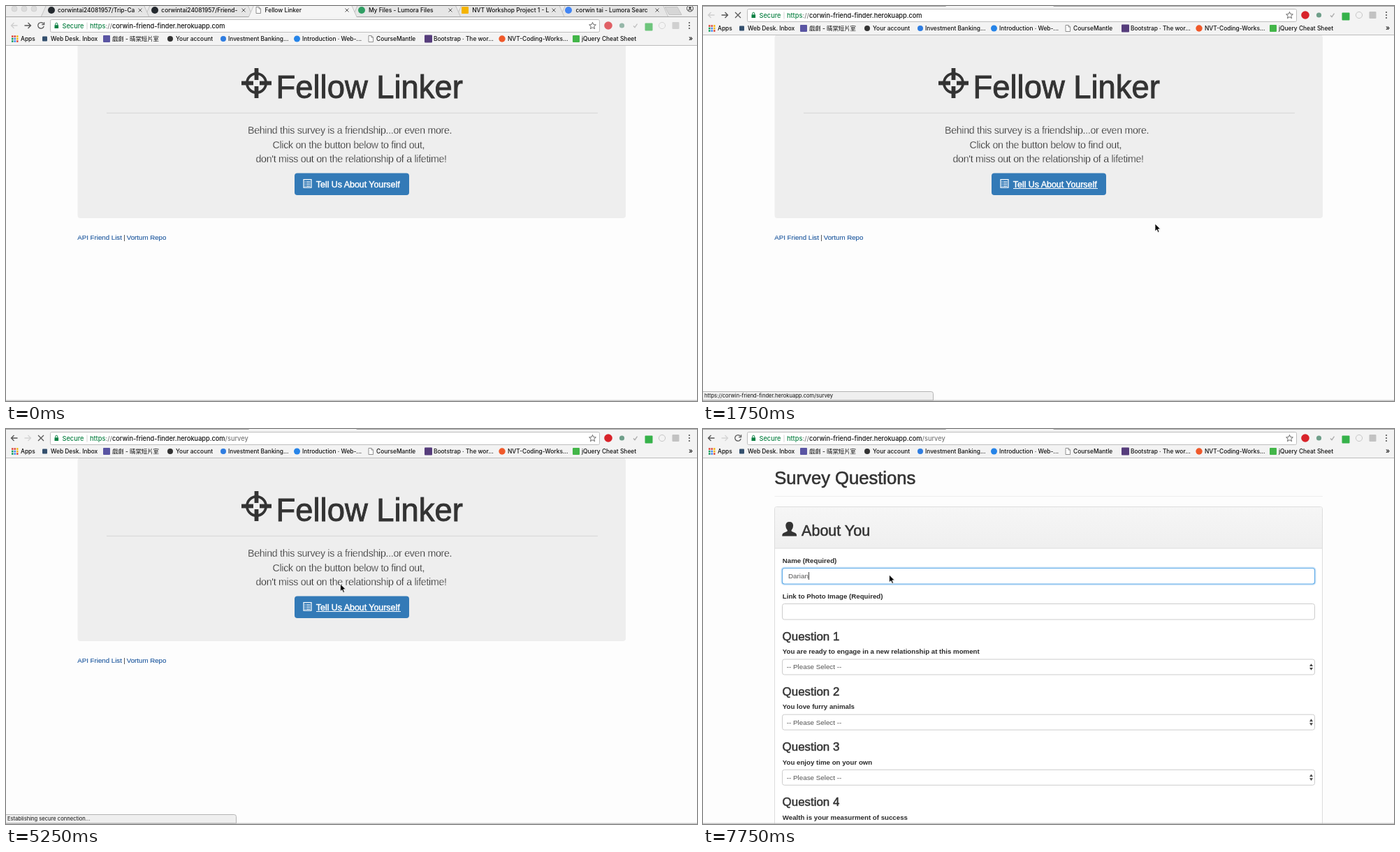
Recreate the animation shown at these times as an HTML page. Size 989 by 566 pixels, loop 8000 ms.

```html
<!DOCTYPE html>
<html lang="en">
<head>
<meta charset="utf-8">
<title>Fellow Linker</title>
<style>
html, body { margin: 0; width: 100%; height: 100%; overflow: hidden; background: #fdfdfd; }
svg { display: block; width: 989px; height: 566px; }
text { white-space: pre; }
.ui { font: 500 8.4px Inter, "Noto Sans CJK TC", "Noto Sans CJK SC", "Noto Sans CJK", sans-serif; fill: #111; }
.url { font-size: 9.2px; }
.tip { font-size: 7.6px; font-weight: 400; }
.page { font: 9.7px "Liberation Sans", Arial, sans-serif; fill: #333; }
.med { stroke: #333; stroke-width: .5px; }
.lead { font-size: 14.2px; letter-spacing: -.29px; fill: #262626; stroke: #eee; stroke-width: .3px; }
.label { font-size: 9.7px; font-weight: bold; fill: #2b2b2b; }
.link { fill: #17539b; stroke: #17539b; stroke-width: .1px; }
.field { fill: #fff; stroke: #ccc; }
.line { fill: none; stroke: #5a5a5a; stroke-width: 1.3px; }
</style>
</head>
<body>
<svg id="stage" viewBox="0 0 989 566" xmlns="http://www.w3.org/2000/svg"></svg>
<script>
const text = (x, y, str, cls, extra = '') => `<text x="${x}" y="${y}" class="${cls}" ${extra}>${str}</text>`;
const rect = (x, y, w, h, fill, extra = '') => `<rect x="${x}" y="${y}" width="${w}" height="${h}" fill="${fill}" ${extra}/>`;
const dot = (x, y, r, fill, extra = '') => `<circle cx="${x}" cy="${y}" r="${r}" fill="${fill}" ${extra}/>`;
const path = (d, extra = '') => `<path d="${d}" ${extra}/>`;
const square = (x, y, s, fill) => rect(x - s / 2, y - s / 2, s, s, fill, 'rx="1"');
const sheet = (x, y) => path(`M${x - 3} ${y - 4.5}h4l2.5 2.5v6.5h-6.5zM${x + 1} ${y - 4.5}v2.5h2.5`, 'fill="#fff" stroke="#777" stroke-width=".8"');
const group = (id, body, extra = '') => `<g id="${id}" ${extra}>${body}</g>`;

function homePage() {
  const [cx, cy] = [358.5, 110.5];
  const spokes = [0, 90, 180, 270].map(a =>
    rect(cx + 4.5, cy - 2.9, 17, 5.8, '#333', `transform="rotate(${a} ${cx} ${cy})"`)).join('');
  const rows = [251.5, 254.5, 257.5].map(y =>
    rect(427.5, y, 1.3, 1.2, '#fff') + rect(429.8, y, 5.7, 1.2, '#fff')).join('');
  return rect(102.5, 41.5, 784.5, 262.5, '#eee', 'rx="4"')
    + dot(cx, cy, 13.6, 'none', 'stroke="#333" stroke-width="3.7"') + spokes
    + text(386.5, 132.3, 'Fellow Linker', 'page med', 'style="font-size:45.4px;stroke-width:.9px"')
    + rect(144, 152.8, 703, 1, '#d6d6d6')
    + text(346, 183, 'Behind this survey is a friendship...or even more.', 'page lead')
    + text(381.5, 203.8, 'Click on the button below to find out,', 'page lead')
    + text(357.5, 224.3, "don't miss out on the relationship of a lifetime!", 'page lead')
    + rect(413, 239.5, 164, 31.5, '#337ab7', 'rx="4"')
    + rect(426, 248.6, 11, 11.6, 'none', 'stroke="#fff" stroke-width="1.2"') + rows
    + text(443.8, 259.6, 'Tell Us About Yourself', 'page', 'style="font-size:12.4px;fill:#fff;stroke:#fff;stroke-width:.45px"')
    + rect(444, 261, 121, 1, '#fff', 'id="under"')
    + text(102.3, 335.3, 'API Friend List', 'page link')
    + text(168.2, 335.3, '|', 'page')
    + text(172.8, 335.3, 'Vortum Repo', 'page link');
}

function surveyPage() {
  const asks = ['You are ready to engage in a new relationship at this moment', 'You love furry animals',
    'You enjoy time on your own', 'Wealth is your measurment of success'];
  const questions = asks.map((ask, i) => {
    const y = 79.15 * i;
    return text(113.6, 302.5 + y, 'Question ' + (i + 1), 'page med', 'style="font-size:16.9px"')
      + text(113.8, 322.3 + y, ask, 'page label')
      + rect(113.5, 330 + y, 762, 22, '#fff', 'class="field" rx="3"')
      + text(119.8, 344.4 + y, '-- Please Select --', 'page', 'style="font-size:9.8px;fill:#555"')
      + path(`M868 ${340 + y}h5l-2.5 -3.8zM868 ${342 + y}h5l-2.5 3.8z`, 'fill="#444"');
  }).join('');
  return text(102.3, 78.8, 'Survey Questions', 'page med', 'style="font-size:25.6px;stroke-width:.6px"')
    + rect(102.5, 96, 784.5, 1, '#eee')
    + rect(102.5, 111.5, 784, 480, '#fff', 'rx="3" stroke="#ddd"')
    + path('M103 171V114.5q0 -2.5 2.5 -2.5h778q2.5 0 2.5 2.5V171z', 'fill="url(#head)"')
    + rect(103, 170.5, 783, 1, '#ddd')
    + path('M113.3 153.6q-.3 -4 3 -5l4 -1.8q1.2 -.8 .2 -2.2q-2.2 -2.8 -2.2 -6q0 -5.6 5.4 -5.6t5.4 5.6q0 3.2 -2.2 6q-1 1.4 .2 2.2l4 1.8q3.3 1 3 5z', 'fill="#333"')
    + text(141.1, 153.2, 'About You', 'page med', 'style="font-size:21.5px;stroke-width:.55px"')
    + text(113.8, 192.2, 'Name (Required)', 'page label')
    + rect(113.5, 199.5, 762, 22.5, '#fff', 'class="field" rx="3"')
    + group('focus', rect(112.5, 198.5, 764, 24.5, 'none', 'rx="4" stroke="#cfe5f8" stroke-width="2"')
      + rect(113.5, 199.5, 762, 22.5, '#fff', 'rx="3" stroke="#66afe9" stroke-width="1.2"'))
    + text(122, 214.3, '', 'page', 'id="typed" style="font-size:9.8px;fill:#555"')
    + rect(0, 205, .9, 11, '#333', 'id="caret"')
    + text(113.8, 243.2, 'Link to Photo Image (Required)', 'page label')
    + rect(113.5, 250.5, 762, 22.5, '#fff', 'class="field" rx="3"')
    + questions;
}

function tabStrip() {
  const titles = ['corwintai24081957/Trip-Ca', 'corwintai24081957/Friend-', 'Fellow Linker',
    'My Files - Lumora Files', 'NVT Workshop Project 1 - L', 'corwin tai - Lumora Searc'];
  const marks = [x => dot(x, 6, 5, '#24292e'), x => dot(x, 6, 5, '#24292e'), x => sheet(x, 6),
    x => dot(x, 6, 5, '#2f9e63'), x => square(x, 6, 10, '#f4b400'), x => dot(x, 6, 5, '#4285f4')];
  const tab = i => {
    const x = 50 + 148.6 * i, end = x + 155, active = i === 2;
    return path(`M${x} 16L${x + 8} -2H${end - 8}L${end} 16`, `fill="${active ? '#f5f5f5' : '#e6e6e6'}" stroke="#b8b8b8" stroke-width=".8"`)
      + marks[i](65 + 148 * i)
      + text(74 + 148.3 * i, 9, titles[i], 'ui')
      + path(`M${189.5 + 148 * i} 3.5l5 5m0 -5l-5 5`, 'stroke="#555" stroke-width="1"');
  };
  return rect(0, 0, 989, 16, '#ededed')
    + [12, 26, 40].map(x => dot(x, 4, 4, '#dcdcdc', 'stroke="#cecece" stroke-width=".8"')).join('')
    + [5, 4, 3, 1, 0].map(tab).join('')
    + path('M943 1.5h18l6 11h-18z', 'fill="#d6d6d6" stroke="#bcbcbc" stroke-width=".8"')
    + dot(979, 3.5, 4.5, 'none', 'stroke="#444"') + dot(979, 2.5, 1.7, '#444') + path('M976 6.5q3 -3 6 0', 'class="line"')
    + rect(0, 15, 989, 1, '#a6a6a6') + tab(2);
}

function toolBar() {
  const arrow = 'm4.5 0h-9m4 -4l-4 4l4 4';
  return rect(0, 16, 989, 40, '#f3f3f3') + rect(0, 56, 989, 1, '#bcbcbc')
    + path('M12 28' + arrow, 'id="back" class="line"')
    + path('M31 28' + arrow, 'id="next" class="line" transform="rotate(180 31 28)"')
    + path('M53.6 25.4a4.3 4.3 0 1 0 .6 3.6M54.6 23.2v3.4h-3.4', 'id="reload" class="line"')
    + path('M46 24l8 8m0 -8l-8 8', 'id="stop" class="line"')
    + rect(63.5, 19.5, 786, 18, '#fff', 'rx="2" stroke="#bdbdbd"')
    + rect(69.5, 27.3, 5.6, 4.7, '#0b8043') + path('M70.8 27.5v-1.6a1.5 1.7 0 0 1 3 0v1.6', 'fill="none" stroke="#0b8043"')
    + text(80.5, 31.5, 'Secure', 'ui url', 'style="fill:#0b8043"') + rect(115.5, 23.5, 1, 10, '#d4d4d4')
    + '<text x="120" y="31.5" class="ui url"><tspan fill="#0b8043">https</tspan><tspan fill="#777">://</tspan>corwin-friend-finder.herokuapp.com<tspan id="route" fill="#777"></tspan></text>'
    + path('M839.5 23.4l1.4 3.2l3.5 .3l-2.7 2.3l.9 3.4l-3.1 -1.8l-3.1 1.8l.9 -3.4l-2.7 -2.3l3.5 -.3z', 'class="line" style="stroke-width:.9px"')
    + group('tools', dot(862, 28, 5.8, '#d8232a') + dot(881.5, 28, 3.6, '#6f9f8a')
      + path('M898 28.5l2 2.2l3.5 -5', 'class="line" style="stroke:#aaa"')
      + square(920, 30, 11, '#36b24a') + dot(939, 28, 4.6, 'none', 'stroke="#c8c8c8"') + square(958.5, 28, 10, '#c2c2c2'))
    + [24, 28, 32].map(y => dot(978, y, 1.1, '#555')).join('');
}

function bookmarks() {
  const y = 47;
  const grid = ['#db4437', '#db4437', '#f4b400', '#0f9d58', '#4285f4', '#f4b400', '#0f9d58', '#4285f4', '#db4437']
    .map((c, i) => rect(8 + i % 3 * 3.5, 42.3 + (i / 3 | 0) * 3.5, 2.5, 2.5, c)).join('');
  const items = [[21, 'Apps', ''], [64, 'Web Desk. Inbox', square(55.5, y, 7, '#34506e')],
    [152, '戲劇 - 晴棠短片室', square(144, y, 10, '#5a55a3')], [243, 'Your account', dot(235, y, 4, '#333')],
    [318, 'Investment Banking...', dot(311, y, 4, '#2f7de1')], [424, 'Introduction · Web-...', dot(416.5, y, 4.5, '#2684e8')],
    [530, 'CourseMantle', sheet(522, y)], [612, 'Bootstrap · The wor...', square(604.5, y, 11, '#563d7c')],
    [718, 'NVT-Coding-Works...', dot(710, y, 4.7, '#f0592a')], [824, 'jQuery Cheat Sheet', square(816, y, 10, '#43b649')]];
  return rect(227, 40.5, 72, 13.5, '#dcdcdc', 'id="hover" rx="2"') + grid
    + items.map(([x, str, mark]) => mark + text(x, 50, str, 'ui')).join('')
    + text(977, 50, '»', 'ui', 'style="font-size:10px"');
}

document.getElementById('stage').innerHTML =
  '<defs><linearGradient id="head" x2="0" y2="1"><stop stop-color="#f6f6f6"/><stop offset="1" stop-color="#efefef"/></linearGradient></defs>'
  + rect(0, 0, 989, 566, '#fdfdfd')
  + group('home', homePage()) + group('survey', surveyPage())
  + group('chrome', tabStrip() + toolBar() + bookmarks())
  + group('status', path('M-1 565V552.5H326.5q3 0 3 3V565z', 'fill="#efefef" stroke="#b4b4b4"') + text(2, 561.2, '', 'ui tip', 'id="note"'))
  + rect(0, 564.7, 989, 1, '#b0b0b0')
  + group('mouse', path('M0 0V10.8L2.5 8.5L4.2 12.4L6 11.6L4.4 7.8H7.8Z', 'fill="#000" stroke="#fff" stroke-width=".8"'));

const el = Object.fromEntries([...document.querySelectorAll('[id]')].map(e => [e.id, e]));
const link = 'https://corwin-friend-finder.herokuapp.com/survey';
const base = { lift: 0, x: 0, y: -30, tools: .7, under: 0, note: '', busy: 0, hover: 0, route: '', survey: 0, focus: 0, typed: '' };

// Each step keeps the values of the one before it
const steps = [
  [0, {}],
  [250, { lift: -8, x: 545, y: 130 }],
  [500, { lift: -15, x: 518, y: 249 }],
  [750, { under: 1, note: link, tools: 1, y: 250 }],
  [1000, { x: 519, y: 251 }],
  [1250, { x: 520, y: 252 }],
  [1500, { busy: 1, x: 545, y: 262 }],
  [1750, { x: 647, y: 312 }],
  [2000, { x: 585, y: 268, note: 'Resolving host...' }],
  [2250, { x: 480, y: 200 }],
  [2500, { x: 385, y: 134 }],
  [2750, { x: 322, y: 76 }],
  [3000, { x: 286, y: 38, hover: 1 }],
  [4000, { x: 375, y: 125, hover: 0 }],
  [4250, { x: 478.5, y: 222, note: 'Establishing secure connection...' }],
  [5250, { route: '/survey' }],
  [5500, { survey: 1, busy: 0, note: 'Waiting for extension Popshade Plus...' }],
  [6000, { note: '' }],
  [6250, { x: 420, y: 220 }],
  [6500, { x: 325, y: 213 }],
  [6750, { x: 266.5, y: 209, focus: 1 }],
  [7000, { typed: 'D' }],
  [7250, { typed: 'Dar' }],
  [7500, { typed: 'Daria' }],
  [7750, { typed: 'Darian' }]
];
let state = base;
const timeline = steps.map(([at, change]) => [at, state = { ...state, ...change }]);

const show = (node, on) => node.style.display = on ? '' : 'none';

function draw(s) {
  el.chrome.setAttribute('transform', `translate(0 ${s.lift})`);
  el.mouse.setAttribute('transform', `translate(${s.x} ${s.y})`);
  el.tools.style.opacity = s.tools;
  show(el.home, !s.survey);
  show(el.survey, s.survey);
  show(el.under, s.under);
  show(el.status, s.note);
  show(el.hover, s.hover);
  show(el.stop, s.busy);
  show(el.reload, !s.busy);
  show(el.focus, s.focus);
  show(el.caret, s.focus);
  el.back.style.stroke = s.route ? '#555' : '#cfcfcf';
  el.next.style.stroke = s.route ? '#d4d4d4' : '#555';
  el.note.textContent = s.note;
  el.route.textContent = s.route;
  el.typed.textContent = s.typed;
  if (s.focus) el.caret.setAttribute('x', 122 + (s.typed ? el.typed.getComputedTextLength() : 0) + .2);
}

let last;
function tick() {
  const t = performance.now() % 8000;
  const now = timeline.filter(([at]) => at <= t).pop()[1];
  if (now !== last) draw(last = now);
  requestAnimationFrame(tick);
}
tick();
</script>
</body>
</html>
```
